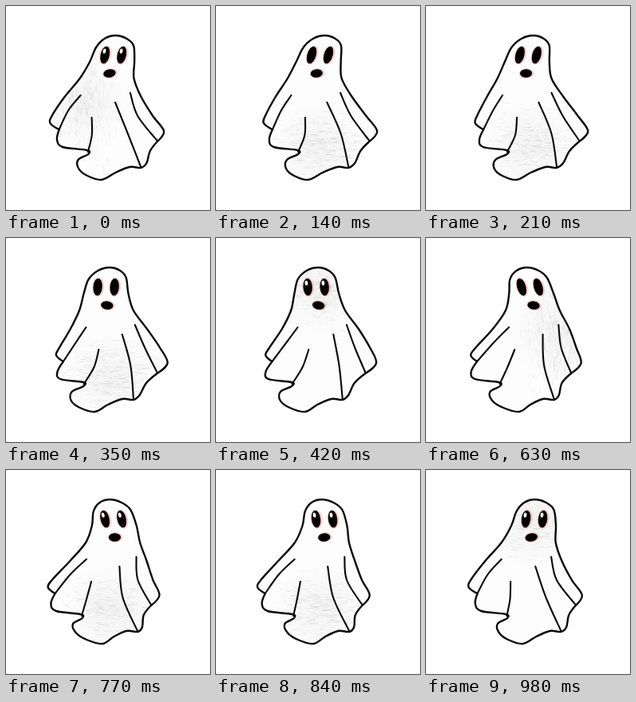
An HTML page with a canvas that plays this animation: 256x256 px, repeating every 1.05 s.

```html
<!DOCTYPE html>
<html lang="en">
<head>
<meta charset="utf-8">
<title>Ghost</title>
<style>
html, body { margin: 0; width: 100%; height: 100%; overflow: hidden; background: #fff; }
canvas { display: block; width: 100vw; height: 100vh; }
</style>
</head>
<body>
<canvas id="c"></canvas>
<script>
const canvas = document.getElementById('c');
const ctx = canvas.getContext('2d');
const STEP = 70, STEPS = 15, TAU = Math.PI * 2;

// A sine wave runs up the resting figure and shifts every height sideways
const AMP = 5.5, FREQ = 0.041;
const phase = (y, t) => t + FREQ * y - 1.7;
const shift = (y, t) => AMP * Math.cos(phase(y, t));
const slope = (y, t) => -AMP * FREQ * Math.sin(phase(y, t));

// Resting outline as "x,y" points; "!" marks a corner
const points = text => text.split(' ').map(p => {
  const [x, y] = p.split(',').map(parseFloat);
  return { x, y, corner: p.endsWith('!') };
});
const body = points(
  '132,37 118,41 108,52 103,70 95,91 79,114 62,137 57.5,147 67,155! ' +
  '61.5,168 67,177 97,181 98,186 85,193 86,204 98,213 117,218 133,209 ' +
  '150,202 164,203 171,197 176,182 187,170! 198,157 188,138 175,114 ' +
  '163,91 159,70 155,50 146,41');
const folds = [
  '99,112 83,131 67,155', '111,140 106.5,162 98,183',
  '142.5,121 152,160 164,202', '161,109 169,138 187,169'
].map(points);

// Shaded side of the cloth and eye glints, one letter per step
const sides = { l: [-1, 0], r: [1, 0], t: [0, -1], b: [0, 1] };
const shade = 'llbbbbttrrrbbtt';
const glints = '110000110001111';

function random(seed) {
  return () => (seed = (seed * 16807) % 2147483647) / 2147483647;
}

function spline(pts, t, closed) {
  const n = pts.length;
  const at = i => {
    const p = pts[closed ? (i + n) % n : Math.max(0, Math.min(n - 1, i))];
    return { ...p, x: p.x + shift(p.y, t) };
  };
  const path = new Path2D();
  path.moveTo(at(0).x, at(0).y);
  for (let i = 0; i < (closed ? n : n - 1); i++) {
    const p = at(i - 1), q = at(i), r = at(i + 1), s = at(i + 2);
    const k = q.corner ? 0 : 1 / 6, m = r.corner ? 0 : 1 / 6;
    path.bezierCurveTo(
      q.x + (r.x - p.x) * k, q.y + (r.y - p.y) * k,
      r.x - (s.x - q.x) * m, r.y - (s.y - q.y) * m, r.x, r.y);
  }
  if (closed) path.closePath();
  return path;
}

function drawShade(shape, step) {
  const [sx, sy] = sides[shade[step]];
  const cx = 131 + sx * 34, cy = 120 + sy * 55;
  const w = sx ? 20 : 34, h = sx ? 46 : 22;
  const rnd = random(71 + step * 997);
  const spread = () => (rnd() + rnd() + rnd() - 1.5) * 1.8;
  ctx.save();
  ctx.clip(shape);
  ctx.fillStyle = '#fdfdfd';
  ctx.fillRect(0, 0, 256, 256);
  const glow = ctx.createRadialGradient(cx, cy, 0, cx, cy, 60);
  glow.addColorStop(0, 'rgba(80,80,80,0.06)');
  glow.addColorStop(1, 'rgba(80,80,80,0)');
  ctx.fillStyle = glow;
  ctx.fillRect(0, 0, 256, 256);
  for (let i = 0; i < 380; i++) {
    const x = cx + spread() * w, y = cy + spread() * h, len = 2 + rnd() * 8;
    ctx.fillStyle = `rgba(70,70,70,${0.02 + rnd() * 0.07})`;
    ctx.fillRect(x, y, sx ? 0.9 : len, sx ? len : 0.9);
  }
  ctx.restore();
}

function oval(x, y, rx, ry, color) {
  ctx.beginPath();
  ctx.ellipse(x, y, rx, ry, 0, 0, TAU);
  ctx.fillStyle = color;
  ctx.fill();
}

// Eyes and mouth lean with the wave at their height
function feature(x, y, rx, ry, t, glint) {
  ctx.save();
  ctx.transform(1, 0, slope(y, t), 1, x + shift(y, t), y);
  oval(0.6, 0, rx + 1.8, ry + 1.2, 'rgba(255,90,90,0.28)');
  oval(0, 0, rx, ry, '#000');
  if (glint) oval(-1.5, -5, 1.9, 3.1, '#fff');
  ctx.restore();
}

function draw(step) {
  const t = step / STEPS * TAU;
  ctx.setTransform(canvas.width / 256, 0, 0, canvas.height / 256, 0, 0);
  ctx.fillStyle = '#fff';
  ctx.fillRect(0, 0, 256, 256);

  const shape = spline(body, t, true);
  drawShade(shape, step);
  ctx.strokeStyle = '#080808';
  ctx.lineCap = ctx.lineJoin = 'round';
  ctx.lineWidth = 2.4;
  ctx.stroke(shape);
  ctx.lineWidth = 2.1;
  for (const f of folds) ctx.stroke(spline(f, t, false));

  const glint = glints[step] === '1';
  for (const x of [120.5, 141.5]) feature(x, 61.5, 5.7, 10.8, t, glint);
  feature(131, 84.5, 7.6, 5.2, t, false);
}

let last = -1;
function resize() {
  const d = window.devicePixelRatio || 1;
  canvas.width = Math.round(innerWidth * d);
  canvas.height = Math.round(innerHeight * d);
  last = -1;
}

const start = performance.now();
function tick() {
  const step = Math.floor((performance.now() - start) / STEP) % STEPS;
  if (step !== last) draw(last = step);
  requestAnimationFrame(tick);
}

addEventListener('resize', resize);
resize();
tick();
</script>
</body>
</html>
```
